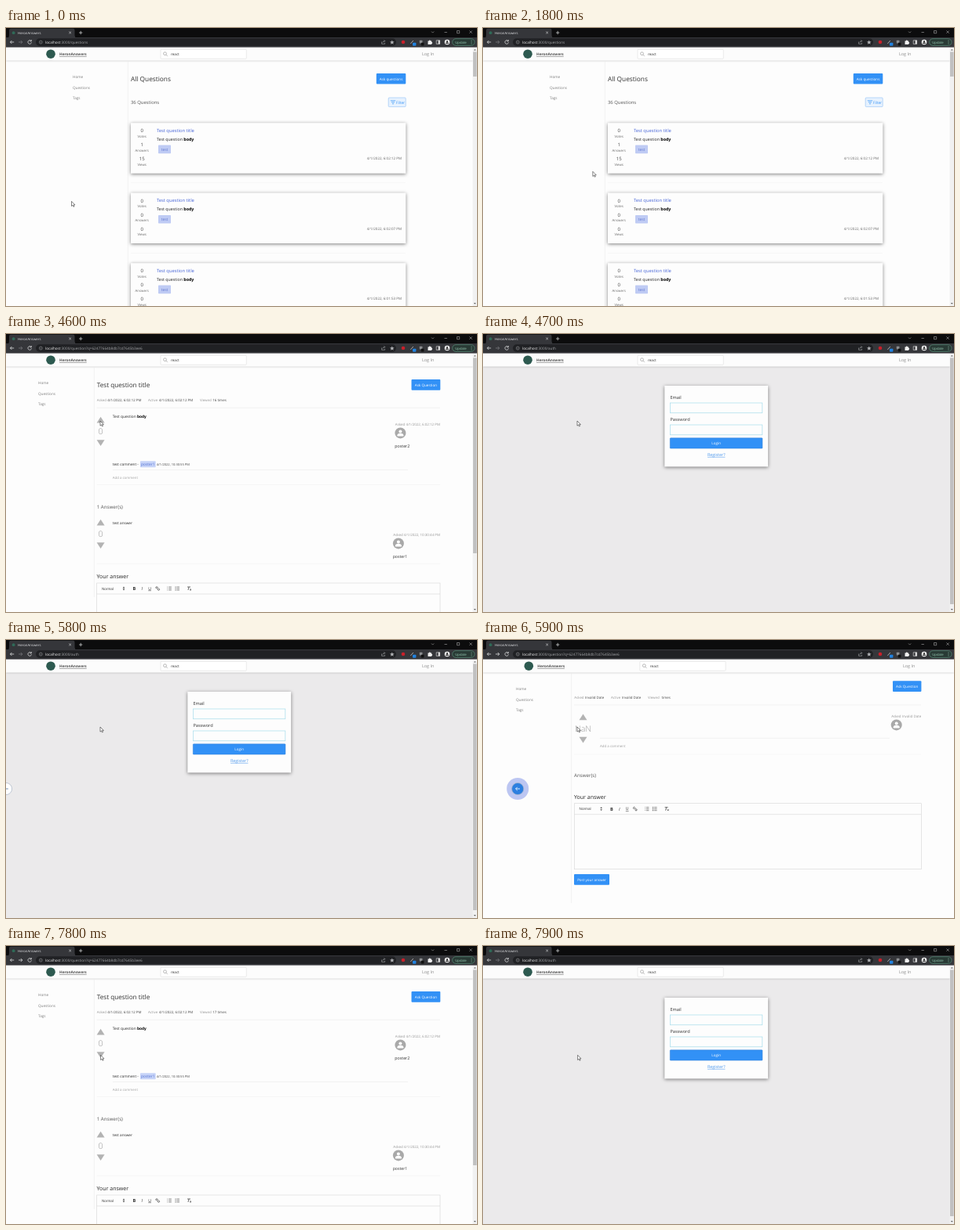
Write an HTML page that moves like this. It is 600x355 px and loops after 8 s.

```html
<!DOCTYPE html>
<html lang="en">
<head>
<meta charset="utf-8">
<title>HeronAnswers</title>
<style>
  html, body { margin: 0; width: 100%; height: 100%; overflow: hidden; background: #fdfdfd; }
  svg { display: block; width: 600px; height: 355px; text-rendering: geometricPrecision; }
  text { font-family: "Open Sans", "Noto Sans", sans-serif; white-space: pre; }
  .card { filter: drop-shadow(0 1px 2px rgba(0, 0, 0, .5)); }
  .bar { filter: drop-shadow(0 .7px 1px rgba(0, 0, 0, .28)); }
</style>
</head>
<body>
<svg id="stage" viewBox="0 0 600 355"></svg>
<script>
const LOOP = 8000, STEP = 100;
const BLUE = '#3291f6', GREY = '#969696', INK = '#222';
const SITE = 'HeronAnswers';

// Drawing helpers
const rect = (x, y, w, h, fill, more = '') =>
  `<rect x="${x}" y="${y}" width="${w}" height="${h}" fill="${fill}" ${more}/>`;
const circle = (x, y, r, fill, more = '') =>
  `<circle cx="${x}" cy="${y}" r="${r}" fill="${fill}" ${more}/>`;
const text = (x, y, size, fill, str, more = '') =>
  `<text x="${x}" y="${y}" font-size="${size}" fill="${fill}" ${more}>${str}</text>`;
const mid = (x, y, size, fill, str, more = '') =>
  text(x, y, size, fill, str, `text-anchor="middle" ${more}`);
const end = (x, y, size, fill, str) => text(x, y, size, fill, str, 'text-anchor="end"');
const line = (d, color, width = .7, more = '') =>
  `<path d="${d}" fill="none" stroke="${color}" stroke-width="${width}" ${more}/>`;
const shape = (d, fill) => `<path d="${d}" fill="${fill}"/>`;
const rule = (x1, x2, y, color = '#e9e9e9') => line(`M${x1} ${y}H${x2}`, color, .6);
const bold = str => `<tspan font-weight="700" fill="#000">${str}</tspan>`;

function browser() {
  const pale = '#dcdddf';
  return rect(0, 0, 600, 12.5, '#0c0c0d') +
    shape('M2 12.5Q4 12 4 9.5V3Q4 .8 6.2 .8H85.5Q87.5 .8 87.5 3V9.5Q87.5 12 90 12.5Z', '#35363a') +
    rect(0, 12, 600, 12.6, '#35363a') +
    circle(9.6, 6.2, 1.9, '#2f6b58') +
    text(15, 7.9, 4.3, '#e4e5e7', SITE) +
    line('M80.2 4.5l2.8 2.8m0-2.8l-2.8 2.8', pale, .6) +
    line('M93 6h4.4M95.2 3.8v4.4', pale, .7) +
    line('M542 4.5l1.6 1.6 1.6-1.6M558.5 5.5h3.4M574.5 3.5h3.2v3.2h-3.2zM590.4 3.4l3.4 3.4m0-3.4l-3.4 3.4', '#c8c8c8', .5) +
    line('M10.2 18H5.4m2-2l-2 2 2 2', pale, .8) +
    line('M16 18h4.8m-2-2l2 2-2 2', '#77787b', .8, 'id="forward"') +
    line('M31.9 16.4A2.3 2.3 0 1 0 32.5 18.4M32.3 15v1.9h-1.9', pale, .8) +
    rect(38, 13.3, 459, 9.6, '#202124', 'rx="4.8"') +
    line('M42.3 18.1a2 2 0 1 0 4 0a2 2 0 1 0-4 0M44.3 17.8v1.3M44.3 16.8v.5', '#a9abae', .5) +
    '<text id="url" x="50" y="19.8" font-size="4.65" fill="#a5a7aa"></text>' +
    line('M478.6 17.5v2.8h4v-1.5M479.8 18.6q.6-2 2.8-2m-1-1.2l1.2 1.2-1.2 1.2', '#c4c6c8', .5) +
    shape('M491.8 15.4l.8 1.9 2 .2-1.5 1.3.5 2-1.8-1.1-1.8 1.1.5-2-1.5-1.3 2-.2z', '#aeb0b3') +
    circle(506, 18, 2.3, '#c9202b') +
    line('M515.3 20l3.6-4', '#aeb0b3', .9) + rect(518, 18.8, 4.4, 4, '#2182e0', 'rx=".7"') +
    rect(526.8, 15.8, 3.6, 3.6, '#8c8e91', 'rx=".5"') + rect(528.8, 18.8, 3.6, 3.8, '#111', 'rx=".7"') +
    shape('M537.5 16.6h1.3a1 1 0 0 1 2 0h1.4v1.5a1 1 0 0 1 0 2v1h-4.7z', '#f1f1f1') +
    line('M548.2 15.8h4.4v4.6h-4.4z', '#e8e8e8', .6) + rect(550.7, 15.8, 1.9, 4.6, '#e8e8e8') +
    circle(562, 18, 3.3, '#f2f2f2') + circle(562, 17.2, 1.1, '#333') + shape('M559.8 20a2.2 1.7 0 0 1 4.4 0z', '#333') +
    rect(568.7, 13.7, 28.3, 8.7, '#293a35', 'rx="4.3" stroke="#5f9c83" stroke-width=".6"') +
    text(572.3, 19.6, 4.2, '#9bd0b8', 'Update') +
    [16, 18, 20].map(y => circle(593, y, .5, '#9bd0b8')).join('');
}

function header(a = 0, b = 0, c = 0) {
  return rect(0, 24.6, 600, 17, '#fcfcfc', 'class="bar"') +
    circle(57 + a, 33.2, 5.8, '#2d5a50') +
    text(68 + a, 35.3, 4.75, '#505050', SITE, 'font-weight="700" text-decoration="underline"') +
    rect(197 + b, 27.3, 109.3, 12, '#fff', 'rx="1" stroke="#dedede" stroke-width=".6"') +
    line(`M${200.6 + b} 32.7a1.9 1.9 0 1 0 3.8 0a1.9 1.9 0 1 0-3.8 0m3.2 1.4l2 2`, '#8b8b8b', .6) +
    text(210 + b, 35, 4.6, '#333', 'react') +
    text(530 + c, 35.4, 5.4, '#8b8b8b', 'Log In');
}

function scrollbar(bottom, color = '#c1c1c1') {
  return rect(594.5, 24.6, 5.5, 330.4, '#f1f1f1') +
    rect(595, 30.5, 4.6, bottom - 30.5, color) +
    shape('M595.8 28.6h3l-1.5-1.7zM595.8 351h3l-1.5 1.7z', '#666');
}

const sidebar = (x, edge) =>
  ['Home', 'Questions', 'Tags'].map((s, i) => text(x, 64.1 + i * 13.5, 4.65, '#7d7d7d', s)).join('') +
  line(`M${edge} 42V${edge > 150 ? 355 : 336}`, '#e9e9e9', .6);

const button = (x, y, w, h, label, size = 4.6) =>
  rect(x, y, w, h, BLUE, 'rx="1"') + mid(x + w / 2, y + h / 2 + 1.7, size, '#fff', label);

function entry(y, answers, views, time) {
  const stats = [[0, 'Votes'], [answers, 'Answers'], [views, 'Views']];
  return rect(159, y, 350.3, 64.5, '#fdfdfd', 'class="card"') +
    stats.map(([n, label], i) =>
      mid(173.2, y + 12.2 + i * 18, 6, '#444', n) +
      mid(173.2, y + 18.6 + i * 18, 4.35, '#666', label)).join('') +
    text(192, y + 11.8, 5.8, '#4463d6', 'Test question title') +
    text(192, y + 22.9, 5.3, INK, 'Test question ' + bold('body')) +
    rect(194, y + 28.4, 16, 10.6, '#bfcbf4', 'rx=".7"') +
    mid(202, y + 35.6, 5, '#6179cf', 'test') +
    end(504, y + 47.2, 4.5, '#666', `4/1/2022, ${time} PM`);
}

function listPage() {
  return header() + sidebar(85, 155.3) +
    text(159, 68.2, 8.3, '#333', 'All Questions') +
    button(471.8, 58, 37.5, 13.6, 'Ask questions') +
    text(159, 97.2, 5.9, '#555', '36 Questions') +
    rect(487.2, 89, 22, 11.6, '#e7f2fe', 'rx="1" stroke="#8fc0f7" stroke-width=".6"') +
    line('M489.8 92.8h6.4M490.9 94.8h4.2M492 96.8h2', BLUE, .7) +
    text(497, 96.5, 4.7, BLUE, 'Filter') +
    rule(159, 509, 197.5, '#f3f3f3') + rule(159, 509, 287.5, '#f3f3f3') +
    entry(121.2, 1, 15, '6:02:12') + entry(210.5, 0, 0, '6:02:07') + entry(300.2, 0, 0, '6:01:53') +
    scrollbar(62);
}

const votes = (x, y, count) =>
  shape(`M${x} ${y - 4.2}l5 7.8h-10z`, '#b3b3b3') +
  mid(x, y + 18.4, 10.6, '#999', count, 'font-weight="300"') +
  shape(`M${x} ${y + 33}l5-7.8h-10z`, '#b3b3b3');

const avatar = (x, y) =>
  circle(x, y, 7, '#a9a9a9') + circle(x, y - 2, 2, '#fff') +
  shape(`M${x - 4} ${y + 4}v-1a4 2.6 0 0 1 8 0v1z`, '#fff');

function facts(y, date, views, xs) {
  const item = (i, label, value, id = '') =>
    text(xs[i], y, 4.4, GREY, label) + text(xs[i + 3], y, 4.4, '#444', value, id);
  return item(0, 'Asked', date) + item(1, 'Active', date) + item(2, 'Viewed', views, 'class="views"');
}

function editor(x, y, w, h) {
  const c = y + 7;
  const sans = 'style="font-family:\'Liberation Sans\',Arial,sans-serif"';
  const list = (lx, mark) => [-2, 0, 2].map(d =>
    line(`M${lx - .8} ${c + d}h3.6`, '#444', .6) + circle(lx - 2.2, c + d, mark, '#444')).join('');
  return rect(x, y, w, h, 'none', 'stroke="#d6d6d6" stroke-width=".6"') +
    rule(x, x + w, y + 14, '#d6d6d6') +
    text(x + 6.2, c + 1.7, 4.7, '#444', 'Normal', sans) +
    shape(`M${x + 33} ${c - .6}h2.6l-1.3-1.8zM${x + 33} ${c + .6}h2.6l-1.3 1.8z`, '#444') +
    mid(x + 47.7, c + 2, 5.6, '#333', 'B', 'font-weight="700"') +
    mid(x + 57.5, c + 2, 5.6, '#333', 'I', 'font-style="italic"') +
    mid(x + 67.4, c + 1.6, 5.2, '#333', 'U', 'text-decoration="underline"') +
    `<g transform="rotate(45 ${x + 77.5} ${c})">` +
    line(`M${x + 77} ${c - 1.1}h-1.2a1.1 1.1 0 0 0 0 2.2h1.2m1-2.2h1.2a1.1 1.1 0 0 1 0 2.2h-1.2m-1.7-1.1h2.4`, '#333', .7) + '</g>' +
    list(x + 92.3, .4) + list(x + 102.5, .6) +
    line(`M${x + 115.3} ${c - 2}h4m-2 0l-1 4m2.2-1.4l1.8 1.8m0-1.8l-1.8 1.8`, '#333', .7);
}

function questionPage() {
  const date = '4/1/2022, 6:02:12 PM';
  return header() + sidebar(41, 112.3) +
    text(115.7, 68.2, 8.2, '#333', 'Test question title') +
    button(516.5, 58, 36.8, 13.7, 'Ask Question') +
    facts(86, date, '', [115.7, 181, 247, 129.3, 195, 263.3]) +
    rule(115.7, 553, 94.3) +
    votes(120.6, 110, 0) +
    text(135.8, 106.8, 4.8, INK, 'Test question ' + bold('body')) +
    end(553, 116.7, 4.45, GREY, 'Asked ' + date) +
    avatar(502.4, 126.4) + text(495.2, 144.8, 5.35, '#333', 'poster2') +
    text(135.8, 168.2, 4.7, INK, 'test comment -') +
    rect(171, 162.2, 19.7, 8, '#c6d3f8', 'rx=".7"') +
    mid(180.8, 168.1, 4.85, '#5875d2', 'poster1') +
    text(191.8, 168.1, 4.05, '#444', '4/1/2022, 10:30:55 PM') +
    rule(135.8, 512, 173.6) +
    text(135.8, 185, 4.35, '#a0a0a0', 'Add a comment') +
    rule(115.7, 553, 192.5, '#f2f2f2') +
    text(115.7, 223.3, 6.2, '#555', '1 Answer(s)') +
    votes(120.6, 241, 0) +
    text(135.8, 242.6, 4.65, INK, 'test answer') +
    end(553, 257.7, 4.45, GREY, 'Asked 4/1/2022, 10:30:44 PM') +
    avatar(499.9, 267.4) + text(492.7, 285.8, 5.2, '#333', 'poster1') +
    rule(115.7, 553, 293.4, '#f2f2f2') +
    text(115.5, 312.3, 7, INK, 'Your answer') +
    editor(115.7, 318, 437.3, 60) +
    scrollbar(280);
}

function blankPage() {
  return header(1.3, 2.8, 5) + sidebar(42, 112.6) +
    button(522, 52.2, 36.4, 13.8, 'Ask Question') +
    facts(74.6, 'Invalid Date', 'times', [116.3, 163, 210, 130, 177, 227.5]) +
    rule(116, 558, 83) +
    votes(127.5, 98.6, 'NaN') +
    rule(149, 518, 125.4) +
    text(149, 136.7, 4.4, '#a0a0a0', 'Add a comment') +
    end(558.2, 98.7, 4.45, GREY, 'Asked Invalid Date') + avatar(526.7, 108.4) +
    rule(116, 558, 146, '#f2f2f2') +
    text(116, 175.2, 6.2, '#555', 'Answer(s)') +
    text(116, 203, 7, INK, 'Your answer') +
    editor(116.3, 208.7, 442, 84) +
    button(116, 299, 45, 13.8, 'Post your answer', 4.55);
}

function authPage() {
  const field = (y, label) =>
    text(238.4, y - 5.4, 5.65, '#333', label) +
    rect(238.4, y, 117.4, 12.8, '#fdfdfd', 'stroke="#a5dcec" stroke-width=".7"');
  return rect(0, 24, 600, 331, '#ebeaeb') + header() +
    rect(231.3, 66, 131.8, 103.4, '#fdfdfd', 'class="card"') +
    field(88, 'Email') + field(116, 'Password') +
    rect(238.3, 132.8, 117.6, 13.3, BLUE, 'rx=".7" stroke="#2779d4" stroke-width=".5"') +
    mid(297.2, 141.1, 4.6, '#fff', 'Login') +
    mid(297.2, 155.9, 5.35, '#4b97ec', 'Register?', 'text-decoration="underline"') +
    scrollbar(345);
}

const pages = { list: listPage, question: questionPage, blank: blankPage, auth: authPage };
const stage = document.getElementById('stage');
stage.innerHTML = rect(0, 0, 600, 355, '#fdfdfd') +
  Object.entries(pages).map(([name, draw]) => `<g id="${name}">${draw()}</g>`).join('') +
  `<g id="swipe">${circle(0, 0, 14, '#bcc6f2', 'id="halo"')}` +
  circle(0, 0, 7.6, '#fff', 'id="disc" stroke="#a9b5c6" stroke-width=".7"') +
  line('M2.8 0H-2.6m2.2-2.2l-2.2 2.2 2.2 2.2', '#4b6f9e', .8, 'id="arrow"') + '</g>' +
  browser() +
  '<path id="cursor" d="M0 0V6.2L1.5 4.9 2.5 7 3.5 6.5 2.6 4.5H4.4Z" fill="#fff" stroke="#333" stroke-width=".6"/>';

const el = id => document.getElementById(id);
const host = '<tspan fill="#f4f4f5">localhost</tspan>:3000/';
const question = host + 'question?q=62477664b8db7cd7645b3ee6';
const urls = { list: host + 'questions', question, blank: question, auth: host + 'auth' };

// [start, page]
const visits = [[0, 'list'], [2500, 'blank'], [2600, 'question'], [4700, 'auth'],
  [5900, 'blank'], [6000, 'question'], [7900, 'auth']];
// [time, x, y]
const pointer = [[0, 83.5, 221.3], [1400, 83.5, 221.3], [2300, 218.6, 130], [3200, 218.6, 130],
  [4300, 120, 111], [6600, 120, 111], [7200, 120.6, 139.3], [LOOP, 120.6, 139.3]];

function pointerAt(t) {
  const i = pointer.findIndex(k => k[0] > t);
  const [a, b] = [pointer[i - 1], pointer[i]];
  const p = (t - a[0]) / (b[0] - a[0]), e = p * p * (3 - 2 * p);
  return [a[1] + (b[1] - a[1]) * e, a[2] + (b[2] - a[2]) * e];
}

function swipe(t) {
  const on = t >= 5800 && t < 6200, fired = t >= 5900;
  el('swipe').style.display = on ? '' : 'none';
  if (!on) return;
  el('swipe').setAttribute('transform', `translate(${fired ? 44.2 : 0} 190)`);
  el('swipe').setAttribute('opacity', fired ? 1 - (t - 5900) / 300 : 1);
  el('halo').style.display = fired ? '' : 'none';
  el('disc').setAttribute('fill', fired ? '#2c7fe0' : '#fff');
  el('arrow').setAttribute('stroke', fired ? '#fff' : '#4b6f9e');
}

let shown = -1;
function render(t) {
  const i = visits.findLastIndex(v => v[0] <= t);
  if (i !== shown) {
    const page = visits[i][1];
    for (const name in pages) el(name).style.display = name === page ? '' : 'none';
    el('url').innerHTML = urls[page];
    el('question').querySelector('.views').textContent = (t < 5000 ? 16 : 17) + ' times';
    el('forward').setAttribute('stroke', t >= 5900 && t < 7900 ? '#dcdddf' : '#77787b');
    shown = i;
  }
  el('cursor').setAttribute('transform', `translate(${pointerAt(t)})`);
  swipe(t);
}

const origin = performance.now();
function tick() {
  const t = (performance.now() - origin) % LOOP;
  render(Math.floor(t / STEP) * STEP);
  requestAnimationFrame(tick);
}
tick();
</script>
</body>
</html>
```
